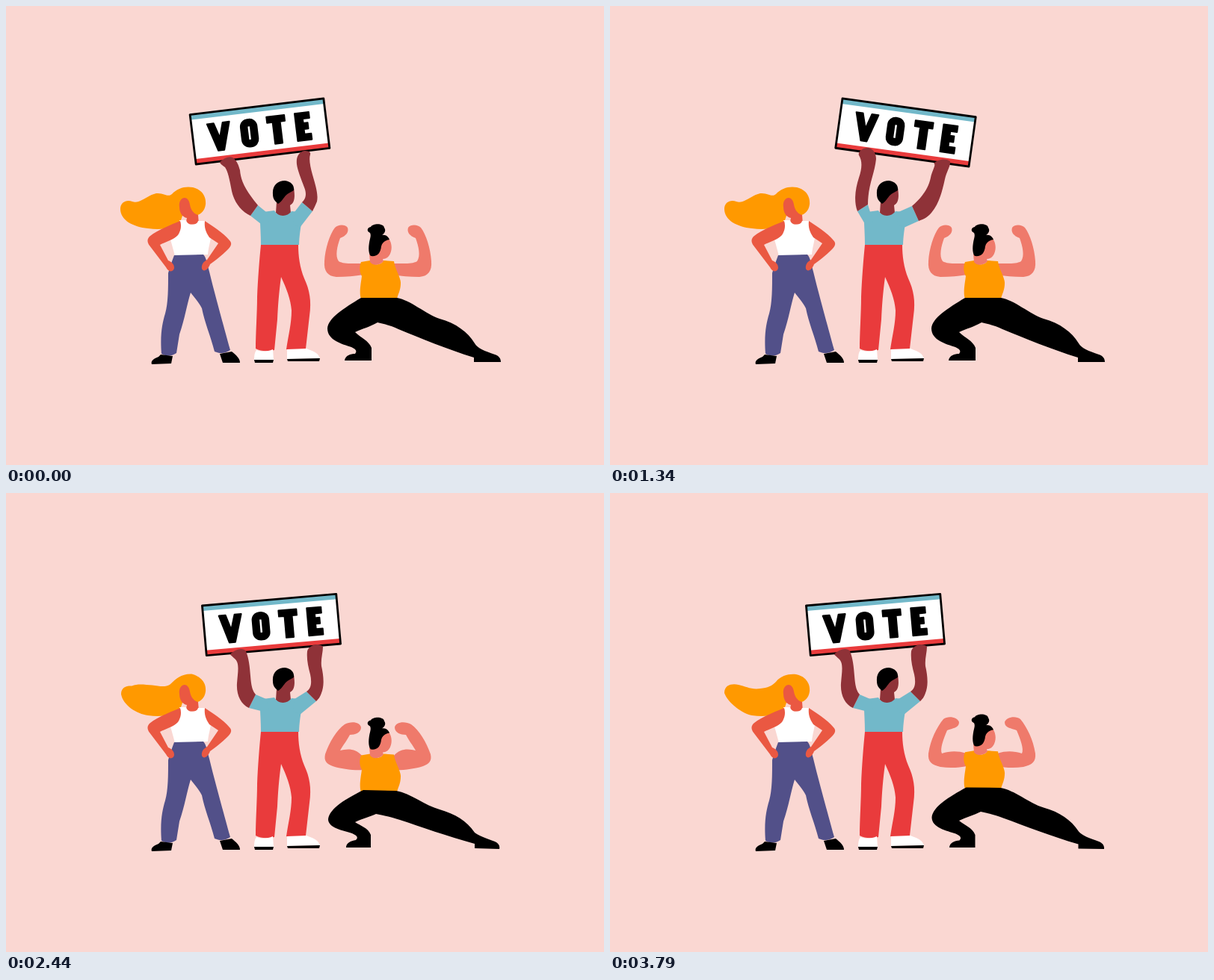
Animation, 800 px wide and 615 px high, one loop 3960 ms. Source, as an HTML page:

```html
<!DOCTYPE html>
<html lang="en">
<head>
<meta charset="utf-8">
<title>Vote</title>
<style>
  html, body { margin: 0; width: 100%; height: 100%; overflow: hidden; background: #fad7d2; }
  svg { display: block; width: 100%; height: 100%; }
  .red { fill: #ea5842; }
  .brown { fill: #8f3238; }
  .pink { fill: #ef7a6b; }
  .orange { fill: #ff9900; }
  .blue { fill: #72b8c9; }
  .scarlet { fill: #e93b3c; }
  .violet { fill: #525089; }
  .white { fill: #fff; }
</style>
</head>
<body>
<svg viewBox="0 0 800 615">
  <!-- standing woman -->
  <g>
    <path id="hair" class="orange"/>
    <path class="red" d="M239 257C234 257 231 263 232 269C232 277 236 283 242 284L240 293L258 292L257 280C250 278 247 272 246 266C245 260 242 257 239 257Z"/>
    <path class="white" d="M232 287L241 287C243 295 255 295 257 288L266 288C267 296 271 300 274 304C275 312 271 321 270 333L226 335C224 327 222 320 220 313C227 309 233 303 234 296Z"/>
    <path class="violet" d="M225 334L264 333C268 337 269 345 272 356C279 385 291 428 300 461C293 466 286 466 279 463C273 440 266 425 262 405C258 397 251 389 247 384C242 400 239 420 232 440L228 465C221 470 213 469 208 466C206 440 209 425 213 412C217 398 217 378 217 358C219 350 222 342 225 334Z"/>
    <path class="red" d="M233 288C221 293 203 300 193 308C188 312 189 317 192 321L214 350C217 357 224 357 225 351C225 346 222 343 217 341L206 320C213 316 225 313 230 307C234 301 235 294 233 288Z"/>
    <path class="red" d="M266 288C275 294 291 304 299 314C303 318 301 322 297 326C289 334 279 342 273 346C270 354 264 357 262 352C261 346 265 342 269 340L284 318L272 310C267 303 265 296 266 288Z"/>
    <path d="M207 467L223 469L221 479L195 480C193 475 199 472 204 470ZM286 466L302 463C308 468 313 472 313 478L290 478Z"/>
  </g>

  <!-- man with the sign -->
  <g>
    <path class="brown" d="M385 244C387 256 386 264 380 267L381 277C376 284 366 284 361 277L362 262C367 262 370 253 385 244Z"/>
    <path d="M357 252C356 240 364 234 373 234C382 235 386 241 385 247L378 251C372 254 370 262 364 265C361 262 357 260 357 252Z"/>
    <path class="blue" d="M344 276L359 274C364 283 376 283 382 275L395 276C397 290 393 296 392 320L341 320C341 305 340 295 340 288Z"/>
    <path class="scarlet" d="M341 320L391 320C391 335 393 350 399 365C406 380 409 395 406 415L401 459C392 462 383 462 375 460C378 440 382 425 382 408C381 393 375 378 368 363C365 385 364 400 363 420L359 461C350 463 341 463 334 459C334 440 336 410 336 390C337 365 339 340 341 320Z"/>
    <path class="white" d="M335 461C343 464 350 463 357 460L358 474L332 474C332 467 333 464 335 461ZM376 460L402 459C408 462 417 463 420 472L376 473Z"/>
    <path d="M332 474L358 474L357 478L333 478ZM376 473L420 472L419 476L377 476Z"/>
    <g id="sign" role="img" aria-label="VOTE">
      <rect class="white" x="-90" y="-33.5" width="180" height="67"/>
      <rect class="blue" x="-90" y="-33.5" width="180" height="7"/>
      <rect class="scarlet" x="-90" y="26.500" width="180" height="7"/>
      <rect x="-90" y="-33.5" width="180" height="67" fill="none" stroke="#000" stroke-width="2.8" stroke-linejoin="round"/>
      <g stroke="#000" stroke-linejoin="round" stroke-linecap="round">
        <path stroke-width="2" d="M-69 -18L-60 -18L-54 2L-48 -18L-39 -18L-50 19L-58 19Z"/>
        <rect x="-20.5" y="-13.500" width="13" height="28" rx="5.500" fill="none" stroke-width="10.500"/>
        <path stroke-width="2" d="M11 -18H35V-10H28.500V19H18.500V-10H11ZM49 -18H68V-10H59V-4H65V4H59V11H68V19H49Z"/>
      </g>
    </g>
    <path id="sleeveL" class="blue"/>
    <path id="sleeveR" class="blue"/>
    <path id="armL" class="brown"/>
    <path id="armR" class="brown"/>
  </g>

  <!-- lunging woman -->
  <g>
    <path id="flexL" class="pink"/>
    <path id="flexR" class="pink" transform="translate(995 0) scale(-1 1)"/>
    <g id="bust">
      <path class="orange" d="M475 343L487 341C490 348 502 348 505 341L519 342C520 352 529 365 528 372C528 380 525 385 523 392L475 392C472 385 475 370 476 362C472 355 473 348 475 343Z"/>
      <path class="pink" d="M508 308C515 312 517 322 515 329C513 336 509 339 504 339L505 342C500 348 490 348 487 343L486 332C497 333 499 318 508 308Z"/>
      <path d="M487 304C482 302 483 297 488 296C491 291 505 291 506 297C509 301 506 305 503 307C509 306 512 310 513 313C507 314 503 317 502 322C501 331 497 336 488 335C484 331 485 320 487 312C488 308 488 306 487 304Z"/>
    </g>
    <path id="legs"/>
  </g>
</svg>
<script>
const LOOP = 3960, TICKS = 96;

const hairEnd = "C262 246 268 255 267 266C266 274 261 279 254 281L236 281L232 293C220 299 205 300 190 298";
const flowing = "M153 272C153 263 161 259 169 262C178 266 188 254 201 251C212 250 216 257 222 252C229 244 240 241 250 243" + hairEnd + "C170 296 153 287 153 272Z";
const lifted = "M155 271C155 263 160 261 165 260C172 251 183 250 190 253C198 256 208 264 217 260C225 255 228 242 248 242" + hairEnd + "C172 296 155 287 155 271Z";
const level = "M153 268C153 257 163 255 172 257C181 259 190 264 201 262C212 261 217 258 222 253C229 244 240 242 249 243" + hairEnd + "C178 296 158 282 153 268Z";
const hairCycle = [flowing, lifted, mix(lifted, level, .5), level];

// Sign centre, tilt and the two arms; each arm path starts and ends at the sleeve.
const poses = {
  left: { sign: [339.5, 168, -6.9],
    armL: "M327 281C314 275 305 262 302 248C299 232 297 222 293 216C289 213 286 211 286 209C292 204 298 201 303 203C309 207 311 213 313 220C314 232 318 244 337 267Z",
    armR: "M396 263C402 258 402 250 399 243C395 232 390 220 389 212C388 203 391 196 399 194C404 194 408 195 407 199C405 205 407 215 410 226C414 240 418 252 416 262C413 269 411 273 410 275Z" },
  midLeft: { sign: [355, 176.5, -5],
    armL: "M325 288C314 283 308 270 309 255C310 240 313 228 306 222C303 219 300 217 300 216C306 210 316 206 321 212C325 222 326 232 327 245C328 257 329 264 334 270Z",
    armR: "M402 266C409 262 409 252 407 243C404 232 402 222 403 212C405 204 418 200 424 206C424 214 421 222 422 232C425 245 426 258 422 268C420 274 418 276 415 279Z" },
  flat: { sign: [369.5, 188.5, 0],
    armL: "M329 295C318 296 306 296 305 288C306 272 317 258 317 240C316 230 312 226 313 224C320 218 330 216 334 224C336 234 334 244 330 254C327 262 326 270 329 276Z",
    armR: "M415 277C422 273 419 264 416 254C413 242 413 232 415 225C420 219 430 218 435 224C433 232 433 240 437 252C440 264 443 280 440 288C436 297 425 297 416 296Z" },
  midRight: { sign: [382.5, 178, 4.5],
    armL: "M328 281C318 278 315 270 317 258C320 245 328 235 329 222C328 215 322 210 323 208C328 203 340 200 345 209C347 220 344 230 340 240C337 250 338 260 342 267Z",
    armR: "M411 271C419 266 423 255 424 242C424 230 425 220 427 215C432 210 442 210 445 215C443 222 441 235 439 250C437 268 432 280 424 283C421 285 419 285 417 286Z" },
  right: { sign: [395.5, 169.5, 7.9],
    armL: "M331 275C326 262 328 245 333 230C337 218 338 208 333 200C331 195 339 189 346 190C353 192 356 198 356 205C354 225 345 240 345 266Z",
    armR: "M404 268C416 258 426 245 429 230C431 220 437 212 433 211C438 206 448 203 455 208C456 214 450 222 448 232C444 250 440 265 430 277C423 285 418 286 413 288Z" }
};
const signCues = [
  [0, "left"], [6, "midLeft"], [13, "flat"], [18, "midRight"], [22, "right"],
  [34, "midRight"], [38, "flat"], [42, "midLeft"],
  [48, "left"], [51, "midLeft"], [63, "flat"], [66, "midRight"], [70, "right"],
  [82, "midRight"], [86, "flat"], [90, "midLeft"]
];

const squatCycle = [0, .5, 1, 1.15, 1, 1.15, 1, .5];
const flexes = [
  "M477 345C462 345 452 346 445 342C440 335 443 322 447 311C455 308 459 303 457 297C453 292 444 293 440 297C433 306 427 325 426 342C425 355 430 362 442 363C455 363 467 362 478 360Z",
  "M477 349C464 345 454 346 444 349C441 343 446 330 451 318C458 315 467 315 467 307C465 300 452 298 446 303C437 314 429 330 426 349C425 360 430 364 442 367C455 369 467 368 478 366Z",
  "M477 353C468 341 455 343 447 345C451 338 457 330 460 324C467 324 475 321 475 314C474 307 462 305 453 310C442 318 433 333 427 350C425 359 429 363 437 366C449 370 466 372 480 371Z"
];
const legsUp = "M475 391L523 391C541 394 562 413 580 419C602 425 618 437 627 452C631 459 640 462 654 467C660 469 662 473 662 477L626 477L626 471C590 460 555 445 525 433C515 428 505 426 497 424C487 430 477 432 467 437C475 445 485 448 489 458L489 475L453 475C454 468 461 466 467 466C470 462 468 460 462 457C450 453 430 448 430 432C431 418 452 405 475 391Z";
const legsDown = "M478 398L522 399C541 402 561 419 580 424C601 430 616 439 627 455C632 459 643 463 654 467C659 469 661 473 660 477L627 476L627 470C590 460 555 447 527 438C515 434 505 432 495 430C486 434 477 436 467 441C474 446 484 448 488 458L488 475L455 475C455 469 461 466 468 465C472 461 469 459 463 456C451 452 431 449 431 437C433 422 456 409 478 398Z";

// Blends two paths that share the same commands.
function mix(from, to, amount) {
  const ends = to.match(/[\d.]+/g);
  let i = 0;
  return from.replace(/[\d.]+/g, n => (+n + (ends[i++] - n) * amount).toFixed(2));
}

const part = id => document.getElementById(id);
const shape = (id, d) => part(id).setAttribute("d", d);
const place = (id, transform) => part(id).setAttribute("transform", transform);
const startOf = d => d.match(/[\d.]+ [\d.]+/)[0];
const endOf = d => d.match(/([\d.]+ [\d.]+)Z/)[1];

function drawSign(tick) {
  const { sign: [x, y, tilt], armL, armR } = poses[signCues.filter(cue => cue[0] <= tick).pop()[1]];
  place("sign", `translate(${x} ${y}) rotate(${tilt})`);
  shape("armL", armL);
  shape("armR", armR);
  shape("sleeveL", `M348 276L${endOf(armL)}L${startOf(armL)}L341 292L352 292Z`);
  shape("sleeveR", `M386 276L${startOf(armR)}L${endOf(armR)}L393 297L384 292Z`);
}

function drawSquat(depth) {
  const flex = flexes[Math.round(depth * 2)];
  shape("flexL", flex);
  shape("flexR", flex);
  shape("legs", mix(legsUp, legsDown, depth));
  place("bust", `translate(0 ${8.5 * depth})`);
}

function draw(now) {
  // Changes fall slightly ahead of the even grid.
  const tick = Math.floor((now % LOOP) / LOOP * TICKS + .15) % TICKS;
  const beat = Math.floor(tick / 4);
  shape("hair", hairCycle[beat % hairCycle.length]);
  drawSign(tick);
  drawSquat(squatCycle[beat % squatCycle.length]);
}

const start = performance.now();
function play() {
  draw(performance.now() - start);
  requestAnimationFrame(play);
}
play();
</script>
</body>
</html>
```
